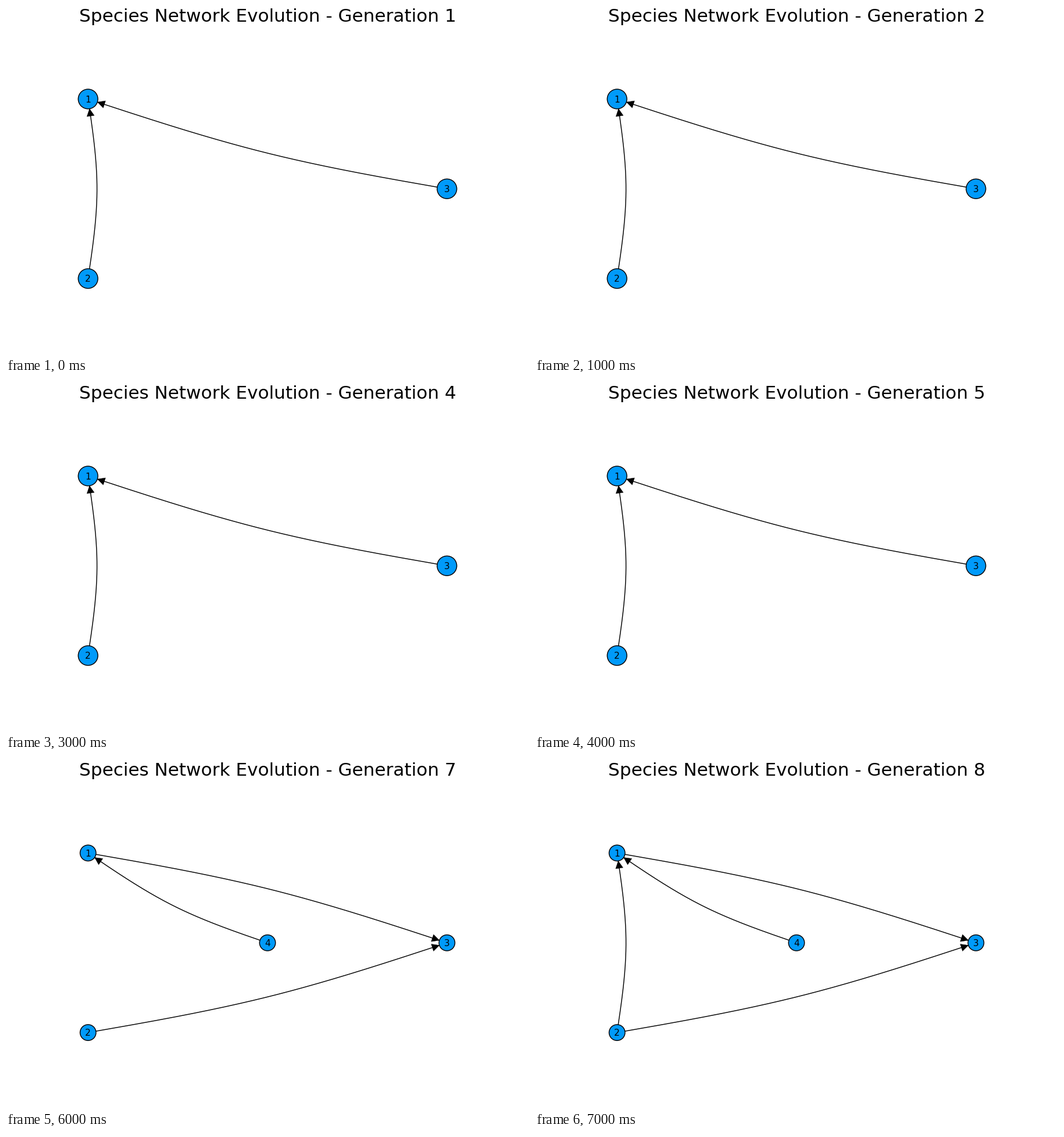
A matplotlib script for the animation above (8 s loop, 900 px wide and 600 px high).

```python
import numpy as np
import matplotlib.pyplot as plt
from matplotlib.animation import FuncAnimation
from matplotlib.patches import Circle, Polygon

W, H, DPI = 900, 600, 100
PX = 72 / DPI  # points per pixel
BLUE = "#009afa"
LINE = 1.45
BOW = 15.4  # sideways bend of every edge, in pixels
ARROW_LEN, ARROW_HALF = 12.7, 6.4

NODES = {
    1: np.array([141.2, 159.9]),
    2: np.array([141.2, 468.6]),
    3: np.array([758.8, 314.3]),
    4: np.array([450.0, 314.3]),
}

# (from, to, side of the bend)
EARLY = [(2, 1, 1), (3, 1, -1)]
LATE = [(1, 3, -1), (4, 1, -1), (2, 3, 1)]

plt.rcParams["font.family"] = "DejaVu Sans"
fig = plt.figure(figsize=(W / DPI, H / DPI), dpi=DPI, facecolor="white")
ax = fig.add_axes([0, 0, 1, 1])


def network(gen):
    """Node count, node radius and edges of one generation."""
    if gen < 6:
        return 3, 16.9, EARLY
    return 4, 13.7, LATE + ([(2, 1, 1)] if gen >= 8 else [])


def curve(a, b, side):
    """Natural cubic spline from a to b through a displaced midpoint."""
    t = np.linspace(-1, 1, 401)[:, None]
    d = (b - a) / np.hypot(*(b - a))
    normal = side * np.array([-d[1], d[0]])
    bump = 1 - 1.5 * t**2 + 0.5 * np.abs(t) ** 3
    return (a + b) / 2 + t * (b - a) / 2 + BOW * bump * normal


def draw_edge(src, dst, side, radius):
    a, b = NODES[src], NODES[dst]
    pts = curve(a, b, side)
    far = np.hypot(*(pts - b).T) >= radius
    pts = pts[far]
    ax.plot(*pts.T, color="black", lw=LINE * PX, zorder=1)
    d = (b - pts[-1]) / np.hypot(*(b - pts[-1]))
    tip = b - radius * d
    base = tip - ARROW_LEN * d
    wing = ARROW_HALF * np.array([-d[1], d[0]])
    ax.add_patch(Polygon([tip, base + wing, base - wing], fc="black",
                         ec="black", lw=0.4 * PX, zorder=2))


def draw_node(label, radius):
    x, y = NODES[label]
    ax.add_patch(Circle((x, y), radius, fc=BLUE, ec="black",
                        lw=LINE * PX, zorder=3))
    ax.text(x, y + 5.8, str(label), fontsize=11.2, ha="center",
            va="baseline", zorder=4)


def draw(i):
    gen = i + 1
    ax.clear()
    ax.set(xlim=(0, W), ylim=(H, 0))
    ax.axis("off")
    ax.text(W / 2, 27, f"Species Network Evolution - Generation {gen}",
            fontsize=22.4, ha="center", va="baseline")
    count, radius, edges = network(gen)
    for src, dst, side in edges:
        draw_edge(src, dst, side, radius)
    for label in range(1, count + 1):
        draw_node(label, radius)
    return []


anim = FuncAnimation(fig, draw, frames=8, interval=1000, repeat=True,
                     repeat_delay=0, init_func=lambda: draw(0))
plt.show()
```
